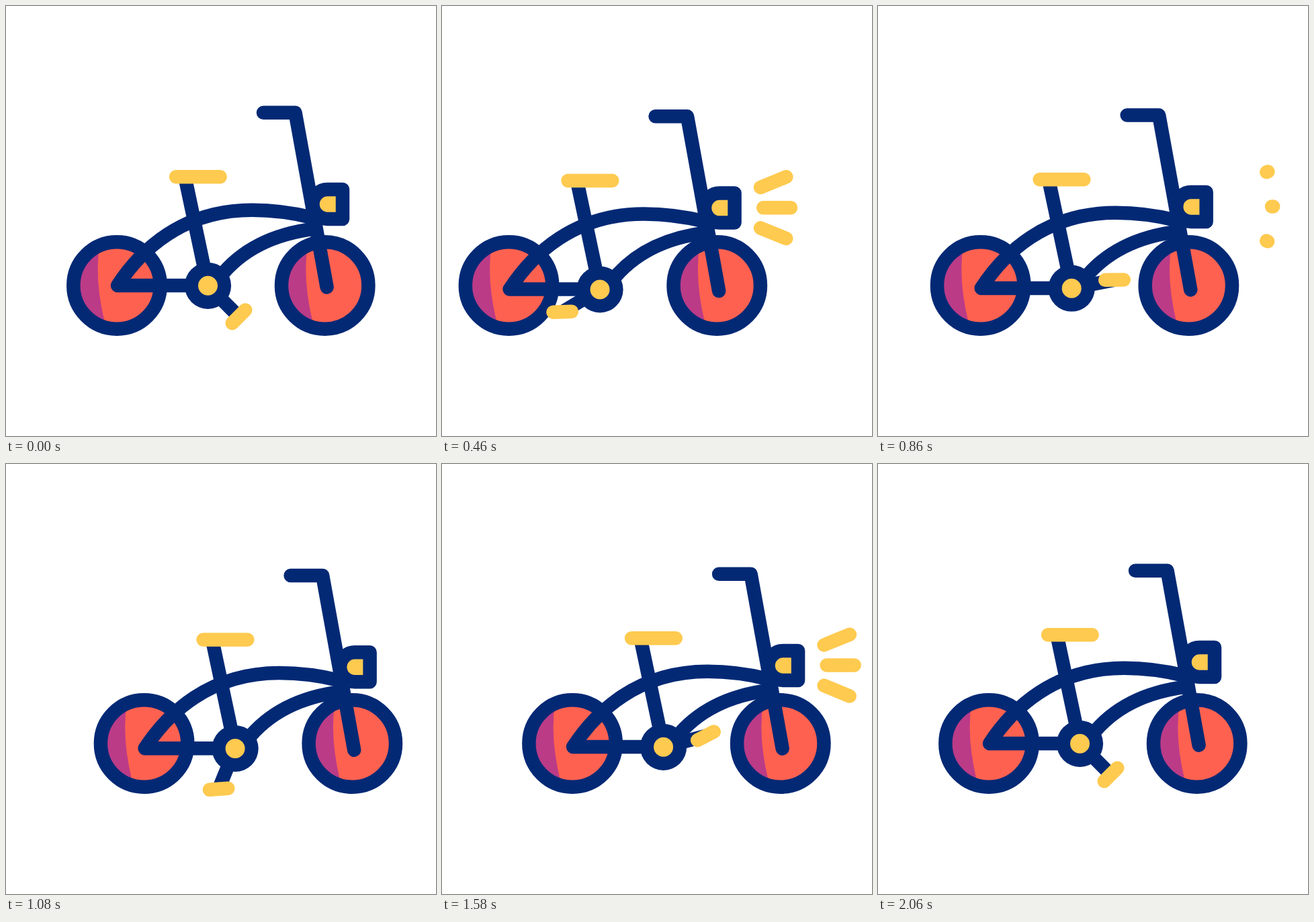
These frames come from a looping animation (640x640 px, 2.42 s). An HTML page:

```html
<!DOCTYPE html>
<html lang="en">
<head>
<meta charset="utf-8">
<title>Bicycle</title>
<style>
  html, body { margin: 0; width: 100%; height: 100%; overflow: hidden; background: #fff; }
  svg { display: block; width: 100%; height: 100%; }
  .navy, .sun { fill: none; stroke-width: 20.5; stroke-linecap: round; stroke-linejoin: round; }
  .navy { stroke: #032975; }
  .sun { stroke: #feca4f; }
  .butt { stroke-linecap: butt; }
</style>
</head>
<body>
<svg viewBox="0 0 640 640">
  <defs>
    <clipPath id="disc"><circle r="60"/></clipPath>
    <g id="wheel">
      <circle r="60" fill="#ff6150"/>
      <path d="M-70,-70 H-24 Q-35,-16 -18.5,53 V70 H-70 Z" fill="#bb3b87" clip-path="url(#disc)"/>
      <circle r="64.7" class="navy"/>
    </g>
  </defs>
  <g id="bike">
    <use href="#wheel" x="165" y="416"/>
    <use href="#wheel" x="474.7" y="416"/>
    <g id="body">
      <path class="navy" d="M300,416 H166 C200,364 262,303.8 366,303.8 C396,303.8 428,308 456,315"/>
      <path class="navy butt" d="M318,404 C350,363 398,339 460,331.5"/>
      <path class="navy butt" d="M266.3,254.3 L300.5,416"/>
      <path class="sun" d="M253,254.3 H318.7"/>
      <path class="navy" fill-rule="evenodd" style="fill:#feca4f" d="M478.5,273 H501 V317 H478.5 A22,22 0 0 1 478.5,273 Z"/>
      <path class="navy" d="M383,158.7 H430.5 L477.6,418.5"/>
      <g transform="translate(300.5 416.3)">
        <path id="crank" class="navy butt" d="M0,0 H65"/>
        <circle r="34.6" fill="#032975"/>
        <circle r="14.5" fill="#feca4f"/>
        <path id="pedal" class="sun" d="M-13.8,0 H13.8"/>
      </g>
      <g id="rays"></g>
    </g>
  </g>
</svg>
<script>
const LOOP = 2420, END = 2060, RIDE = 1920, STEP = 20;
const $ = id => document.getElementById(id);
const clamp = u => Math.min(1, Math.max(0, u));
const ease = (t, a, b) => { const u = clamp((t - a) / (b - a)); return u * u * (3 - 2 * u); };

// [time, value] steps
const SHIFT = [[0, 0], [527, -68.5], [1245, 57.5], [RIDE, 0]];
const TILT = [[0, -45], [280, -9.6], [640, 0], [1080, -4], [1400, -14], [1740, -39], [RIDE, -45]];

// Each step eases in and out
function eased(keys, t) {
  return keys.slice(1).reduce((v, [b, y], i) =>
    v + (y - keys[i][1]) * ease(t, keys[i][0], b), keys[0][1]);
}

// Smooth curve through all steps, at rest at both ends
function curve(keys, t) {
  const last = keys.length - 1;
  if (t >= keys[last][0]) return keys[last][1];
  const i = keys.findIndex(k => k[0] > t) - 1;
  const slope = j => j === 0 || j === last ? 0 :
    (keys[j + 1][1] - keys[j - 1][1]) / (keys[j + 1][0] - keys[j - 1][0]);
  const [a, p] = keys[i], [b, q] = keys[i + 1], d = b - a, u = (t - a) / d;
  const s = u * u * (3 - 2 * u);
  return p + (q - p) * s + d * u * (1 - u) * (slope(i) * (1 - u) - slope(i + 1) * u);
}

// Headlight rays: x1, y1, x2, y2
const RAYS = [
  [539.5, 264.4, 592.7, 242.6],
  [543.6, 294.6, 600.5, 294.6],
  [539.5, 324.8, 592.5, 346.5]
];
const rayEls = RAYS.map(() => {
  const el = document.createElementNS("http://www.w3.org/2000/svg", "line");
  el.setAttribute("class", "sun");
  $("rays").append(el);
  return el;
});

function drawRays(t) {
  const local = t > 1120 ? t - 1120 : t;
  const head = ease(local, 152, 625), tail = ease(local, 478, 910);
  $("rays").style.display = head > tail ? "" : "none";
  RAYS.forEach(([x1, y1, x2, y2], i) => {
    const el = rayEls[i];
    const put = (n, u) => {
      el.setAttribute("x" + n, x1 + (x2 - x1) * u);
      el.setAttribute("y" + n, y1 + (y2 - y1) * u);
    };
    put(1, tail);
    put(2, head);
  });
}

function bob(t) {
  const half = END / 6, phase = t % (2 * half);
  return 7.65 * (ease(phase, 0, half) - ease(phase, half, 2 * half));
}

function draw(t) {
  $("bike").setAttribute("transform", `translate(${eased(SHIFT, t)} 0)`);
  $("body").setAttribute("transform", `translate(0 ${bob(t)})`);
  const turn = 45 + 720 * ease(t, 0, RIDE), rad = turn * Math.PI / 180;
  $("crank").setAttribute("transform", `rotate(${turn})`);
  $("pedal").setAttribute("transform",
    `translate(${65 * Math.cos(rad)} ${65 * Math.sin(rad)}) rotate(${curve(TILT, t)})`);
  drawRays(t);
}

const start = performance.now();
function tick() {
  const t = (performance.now() - start) % LOOP;
  draw(Math.min(END, Math.floor(t / STEP) * STEP));
  requestAnimationFrame(tick);
}
tick();
</script>
</body>
</html>
```
